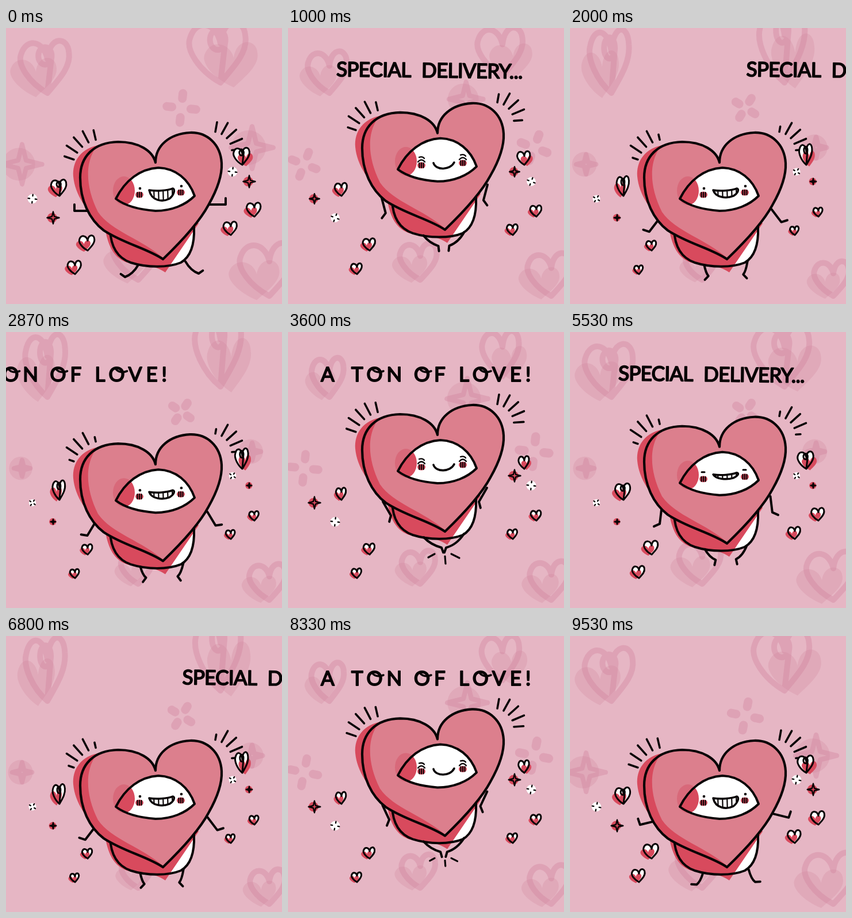
These frames come from a looping animation (480x480 px, 9590 ms). An HTML page with a canvas:

```html
<!DOCTYPE html>
<html lang="en">
<head>
<meta charset="utf-8">
<title>Special delivery</title>
<style>
html, body { margin: 0; width: 100%; height: 100%; overflow: hidden; background: #e6b6c4; }
canvas, svg { position: absolute; left: 0; top: 0; width: 480px; height: 480px; }
text { font: 400 35px Lato, "Open Sans", sans-serif; fill: #080304; stroke: #080304; stroke-width: 1.9; stroke-linejoin: round; }
.tight { letter-spacing: -.7px; }
.wide { letter-spacing: 7px; }
.curl { fill: none; stroke: #080304; stroke-width: 3.5; stroke-linecap: round; }
</style>
</head>
<body>
<canvas id="stage" width="480" height="480"></canvas>
<svg viewBox="0 0 480 480">
  <g id="line0">
    <text class="tight" y="84" transform="rotate(.7 85 84)"><tspan x="84">SPECIAL</tspan> <tspan x="232">DELIVERY...</tspan></text>
  </g>
  <g id="line1">
    <text class="wide" y="86"><tspan x="57">A</tspan> <tspan x="110">TON</tspan> <tspan x="219">OF</tspan> <tspan x="297">LOVE!</tspan></text>
    <path class="curl" d="M146 64q7 9 20 4M229 64q7 9 20 4M333 64q7 9 20 4"/>
  </g>
</svg>
<script>
const c = document.getElementById('stage').getContext('2d');
const lines = [0, 1].map(i => document.getElementById('line' + i));
const INK = '#080304', RED = '#d84a5d', PINK = '#dc7f8d', BG = '#e6b6c4';
const SOFT = 'rgba(205,125,152,.24)', TINT = 'rgba(205,125,152,.34)';
const FRAME = 66.6, LOOP = 9590, HALF = 36, PEAK = 18;

const heart = new Path2D(`M260 234C255 213 230 198 195 198C152 199 129 224 129 260
  C129 300 145 333 170 352C205 375 245 383 273 402C300 376 335 340 352 308
  C368 280 376 255 375 235C373 202 350 181 320 182C285 184 260 204 260 234Z`);
const shade = new Path2D(`M165 203C130 208 115 232 117 258C120 290 140 320 172 345
  C176 376 187 403 215 409C238 412 258 412 277 425L335 340L260 240Z`);
const crescent = new Path2D(`M168 196C138 220 134 268 160 320C185 356 240 367 281 407
  L250 440L100 440L100 190Z`);
const body = new Path2D('M181 350C182 380 194 400 217 408C245 417 282 417 304 408C323 397 328 372 327 346L273 330Z');
const opening = new Path2D('M191 297C207 265 233 245 265 243C295 244 318 263 328 292C312 308 288 318 260 318C232 316 207 309 191 297Z');

const mix = (a, b, k) => a + (b - a) * k;
const clamp = v => Math.min(1, Math.max(0, v));
const rad = deg => deg * Math.PI / 180;
const polar = (x, y, r, deg) => [x + r * Math.cos(rad(deg)), y + r * Math.sin(rad(deg))];

function fill(path, color) { c.fillStyle = color; c.fill(path); }

function ink(path, width = 4, color = INK) {
  c.lineWidth = width;
  c.strokeStyle = color;
  c.stroke(path);
}

function inside(path, draw) {
  c.save();
  c.clip(path);
  draw();
  c.restore();
}

function disc(x, y, rx, color, ry = rx) {
  const path = new Path2D();
  path.ellipse(x, y, rx, ry, 0, 0, 7);
  fill(path, color);
}

// A heart standing on its tip; its colour is printed off register towards `side`.
function miniHeart(x, y, w, h, { big = false, curl = false, side = -1 }) {
  const l = -w * .55, r = w * .45;
  const shape = `M0 0C${l * .7} ${-h * .2} ${l * 1.15} ${-h * .55} ${l} ${-h * .75}
    C${l * .8} ${-h * 1.08} ${-w * .08} ${-h * 1.02} 0 ${-h * .66}
    C${w * .05} ${-h * 1.12} ${r * .95} ${-h * 1.1} ${r} ${-h * .78}
    C${r * 1.1} ${-h * .5} ${r * .5} ${-h * .25} 0 0Z`;
  const path = new Path2D(shape);
  if (curl) path.ellipse(-w * .05, -h * .72, w * .14, h * .17, 0, 0, 6.3);
  c.save();
  c.translate(x, y);
  if (!big) fill(path, '#fff');
  c.save();
  c.translate(side * w * .24, h * .08);
  c.scale(.95, .75);
  fill(new Path2D(shape), big ? SOFT : RED);
  c.restore();
  ink(path, big ? 10 : 3, big ? TINT : INK);
  c.restore();
}

function sparkle(x, y, size, q, red) {
  const big = size > 1, star = red !== q > 14;
  const color = big ? TINT : INK, path = new Path2D();
  const pulse = Math.cos(q * Math.PI / 9);
  c.save();
  c.translate(x, y);
  c.scale(size, size);
  if (star) {
    const r = 7 + 3.5 * pulse;
    disc(-r / 6, 0, 7.2 + 1.4 * pulse, big ? SOFT : RED);
    for (let i = 0; i <= 8; i++) path.lineTo(...polar(0, 0, i % 2 ? r * .28 : r, i * 45));
    ink(path, 2.4, color);
  } else {
    const r = 7.5 + 1.3 * pulse, turn = 6 + 30 * Math.sin(q * Math.PI / PEAK);
    if (!big) disc(0, 0, r * .95, '#fff');
    for (let a = turn; a < turn + 360; a += 90) {
      path.moveTo(...polar(0, 0, r * .55, a));
      path.lineTo(...polar(0, 0, r * .85, a));
    }
    ink(path, big ? 4.4 : 2.3, color);
  }
  c.restore();
}

function heartKit(q, drop) {
  const wave = Math.cos(q * Math.PI / 6);
  const w = 23.5 + 2.5 * wave - 4 * drop, h = 31 - 3 * wave - 13 * drop;
  const s = 21 + 5 * wave * (1 - q / 30);
  return {
    grow: (x, y, k, side) => miniHeart(x, y, w * k, h * k, { big: k > 2, curl: q < 14, side }),
    pulse: (x, y, k) => miniHeart(x, y, s * k, s * k, { big: k > 2 })
  };
}

function backdrop(q, drop, { grow, pulse }) {
  grow(72, 113, 3.2, -1);
  grow(373, 95 - 18 * drop, 3.7, 1);
  pulse(230, 438, 3);
  pulse(458, 466, 3.5);
  sparkle(28, 237, 3.3, q, true);
  sparkle(mix(305, 312, drop), mix(139, 116, drop), 3.4, q, false);
  sparkle(428, 208, 3.5, q, true);
}

function trinkets(q, { grow, pulse }) {
  grow(93, 292, 1, -1);
  grow(411, 238, 1.05, 1);
  pulse(142, 387, 1);
  pulse(120, 428, .88);
  pulse(432, 328, .92);
  pulse(391, 360, .88);
  sparkle(46, 297, 1, q, false);
  sparkle(82, 330, 1, q, true);
  sparkle(394, 250, 1, q, false);
  sparkle(423, 267, 1, q, true);
}

// side is -1 for left and 1 for right; tuck runs from 0 (spread) to 1 (folded).
function arm(side, x, y, tuck) {
  const swing = 120 * tuck, hook = swing + 45 * tuck;
  const aim = side < 0 ? a => a : a => 180 - a;
  const hand = polar(x, y, 28, aim(180 - swing));
  const path = new Path2D();
  path.moveTo(x, y);
  path.lineTo(...hand);
  path.lineTo(...polar(...hand, 11, aim(270 - hook)));
  ink(path);
}

function leg(side, tuck) {
  const k = tuck ** .7, mid = 271;
  const hip = mid + side * mix(41, 35, k), foot = mid + side * mix(64, 4, k);
  const y = 430 - side * 3 * (1 - k);
  const toe = mix(215, 70, k);
  const path = new Path2D();
  path.moveTo(hip, 409 - side * 3);
  path.quadraticCurveTo(mix(hip, foot, .4), y - 5, foot, y);
  path.lineTo(...polar(foot, y, 9, side < 0 ? toe : 180 - toe));
  ink(path);
}

function rays(x, y, r, from, step, edge) {
  for (let i = 0; i < 5; i++) {
    const a = from + step * i, long = i % 4 ? 22 : 17 * edge;
    const path = new Path2D();
    path.moveTo(...polar(x, y, r, a));
    path.lineTo(...polar(x, y, r + long, a));
    ink(path, 3.6);
  }
}

function eye(x, y, q) {
  if (q > 13) ink(new Path2D(`M${x - 6} ${y + 5}q6 -7 12 0M${x - 4} ${y - 3}q6 -2 9 2`), 2.3);
  else if (q > 8) ink(new Path2D(`M${x - 3} ${y - 1}h5`), 3);
  else disc(x + 1, y, 2.3, INK);
}

function cheek(x, y) {
  disc(x, y, 7, RED, 5.5);
  const hatch = new Path2D();
  for (let dx = -3.5; dx < 4; dx += 3.5) {
    hatch.moveTo(x + dx, y - 4);
    hatch.lineTo(x + dx, y + 4);
  }
  ink(hatch, 2.2);
}

function mouth(q) {
  if (q > 13) return ink(new Path2D('M253 286C257 299 282 299 289 285'), 3.6);
  const d = 20 - q;
  const path = new Path2D(`M249 282C262 284 280 283 290 279C295 280 292 ${279 + d * .6} 284 ${281 + d * .8}
    C272 ${283 + d} 253 ${281 + d} 249 282Z`);
  fill(path, '#fff');
  inside(path, () => {
    for (let x = 257; x < 290; x += 8) ink(new Path2D(`M${x} 275l1 35`), 2.2);
  });
  ink(path, 3.5);
}

function courier(q) {
  const lift = Math.max(0, 55 * (1 - ((PEAK - q) / 11.4) ** 2));
  const tuck = (q / PEAK) ** .75;
  c.save();
  c.translate(0, -lift);
  fill(shade, RED);
  fill(body, '#fff');
  inside(body, () => fill(shade, RED));
  arm(-1, mix(147, 165, tuck), mix(318, 350, tuck), tuck);
  arm(1, mix(354, 346, tuck), mix(307, 326, tuck), tuck);
  leg(-1, tuck);
  leg(1, tuck);
  ink(body);
  fill(heart, PINK);
  inside(heart, () => fill(crescent, RED));
  disc(205, 283, 19, '#d8697a', 25);
  ink(heart, 4.2);
  fill(opening, '#fff');
  inside(opening, () => disc(205, 283, 19, RED, 25));
  ink(opening);
  for (const [x, y] of [[232, 290], [304, 286]]) {
    cheek(x, y);
    eye(x, y - 11, q);
  }
  mouth(q);

  const edge = .7 + .3 * Math.cos(q * Math.PI / 9);
  rays(168, 246, 53, 199, 14.5, edge);
  rays(358, 215, 35, 280, 19, edge);
  if (q > 15) {
    const k = (q - 14) / 4;
    ink(new Path2D(`M255 441l${-11 * k} ${6 * k}M273 445l${k} ${13 * k}M284 441l${14 * k} ${7 * k}`), 3.2);
  }
  c.restore();
}

// Each line slides in from the left, rests, then leaves to the right.
function caption(n) {
  const p = n % HALF, out = p > 25 ? p - 25 : Math.min(0, p - 11);
  const current = Math.floor(n / HALF) % 2;
  lines.forEach((g, i) => {
    g.style.display = i === current ? '' : 'none';
    g.setAttribute('transform', `translate(${8.9 * out * Math.abs(out)} 0)`);
  });
}

function draw() {
  const n = Math.floor(performance.now() % LOOP / FRAME);
  const p = n % HALF, q = Math.min(p, HALF - p);
  const drop = clamp((q - 11) / 6), kit = heartKit(q, drop);
  c.lineCap = c.lineJoin = 'round';
  c.fillStyle = BG;
  c.fillRect(0, 0, 480, 480);
  backdrop(q, drop, kit);
  courier(q);
  trinkets(q, kit);
  caption(n);
  requestAnimationFrame(draw);
}
draw();
</script>
</body>
</html>
```
